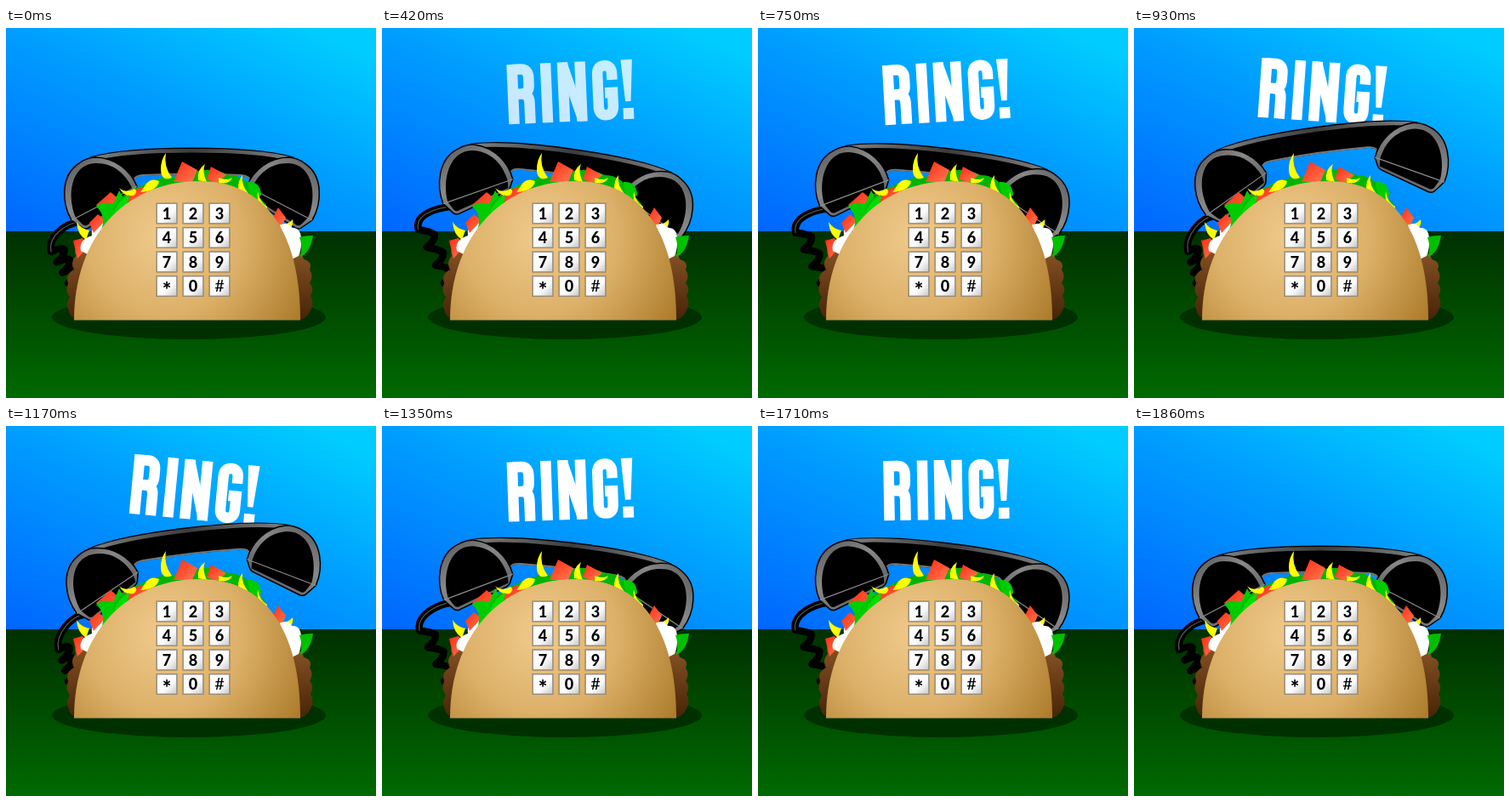
An HTML page for the animation above (1.89 s loop, 435 px wide and 435 px high).

```html
<!DOCTYPE html>
<html lang="en">
<head>
<meta charset="utf-8">
<title>Taco phone</title>
<style>
html, body { margin: 0; width: 100%; height: 100%; overflow: hidden; background: #003300; }
svg { display: block; width: 100vw; height: 100vh; }
.key { font: 800 18px Lato, "Open Sans", sans-serif; text-anchor: middle; fill: #000; }
.star { font-size: 25px; }
.hash { font-weight: 400; font-size: 20px; }
</style>
</head>
<body>
<svg viewBox="0 0 435 435" xmlns="http://www.w3.org/2000/svg">
  <defs>
    <linearGradient id="sky" gradientUnits="userSpaceOnUse" x1="0" y1="239" x2="167" y2="-123">
      <stop offset="0" stop-color="#0066ff"/><stop offset=".54" stop-color="#009dff"/><stop offset=".92" stop-color="#00ccff"/>
    </linearGradient>
    <linearGradient id="grass" x1="0" y1="0" x2="0" y2="1">
      <stop offset="0" stop-color="#003000"/><stop offset="1" stop-color="#006a00"/>
    </linearGradient>
    <radialGradient id="shell" gradientUnits="userSpaceOnUse" cx="185" cy="245" r="185">
      <stop offset="0" stop-color="#f0ca8c"/><stop offset=".5" stop-color="#dcb068"/><stop offset="1" stop-color="#ad7d2c"/>
    </radialGradient>
    <linearGradient id="meat" x1="0" y1="0" x2="0" y2="1">
      <stop offset="0" stop-color="#8a5425"/><stop offset="1" stop-color="#472407"/>
    </linearGradient>
    <linearGradient id="red" x1="0" y1="0" x2="1" y2="1">
      <stop offset="0" stop-color="#ff2a12"/><stop offset="1" stop-color="#ff7a55"/>
    </linearGradient>
    <linearGradient id="rim" x1="0" y1="0" x2="1" y2="1">
      <stop offset="0" stop-color="#555"/><stop offset=".4" stop-color="#888"/><stop offset="1" stop-color="#4c4c4c"/>
    </linearGradient>
    <linearGradient id="bar" gradientUnits="userSpaceOnUse" x1="100" y1="0" x2="337" y2="0">
      <stop offset="0" stop-color="#808080"/><stop offset=".5" stop-color="#3c3c3c"/><stop offset="1" stop-color="#808080"/>
    </linearGradient>
    <linearGradient id="cap" x1="0" y1="0" x2="1" y2="1">
      <stop offset="0" stop-color="#fff"/><stop offset=".6" stop-color="#fafafa"/><stop offset="1" stop-color="#c8c8c8"/>
    </linearGradient>
    <g id="ear" stroke-linejoin="round">
      <path d="M77 226C66 207 63 174 86 159C92 154.500 98 152.500 104 152C128 152 146 167 154 186L152 197Q151 200 148 202L97 235Q93 237 90 235Z" fill="url(#rim)" stroke="#000" stroke-width="1.500"/>
      <path d="M82 223C71 198 76 161 104 159C126 158 140 171 148 188L150 197L95 232Q92 233 90 231Z"/>
      <path d="M77 226L154 186" stroke="#8c8c8c" stroke-width="1.200"/>
    </g>
  </defs>

  <rect width="435" height="240" fill="url(#sky)"/>
  <rect y="239" width="435" height="196" fill="url(#grass)"/>
  <ellipse cx="215" cy="340" rx="161" ry="26" fill="#003000"/>

  <g id="ring" role="img" aria-label="RING!" fill="none" stroke="#fff" stroke-width="12.500">
    <path d="M-68 -35V35M-68 -29H-58Q-49 -29 -49 -19V-10Q-49 0 -58 0H-68M-58 0Q-49 0 -49 11V35"/>
    <path d="M-28.500 -35V35M-8.500 -35V35M12 -35V35"/>
    <path d="M-14 -35H-3L18 35H7Z" fill="#fff" stroke="none"/>
    <path d="M49 -12V-19Q49 -29 40.500 -29Q32 -29 32 -19V19Q32 29 40.500 29Q49 29 49 19V3H40"/>
    <path d="M60 -35H73.500L70 14H63.500ZM60.500 22H73V35H60.500Z" fill="#fff" stroke="none"/>
  </g>

  <g fill="none" stroke-linecap="round" stroke-linejoin="round">
    <path id="cord" stroke="#000" stroke-width="8.500"/>
    <path id="shine" stroke="#555" stroke-width="1.200"/>
  </g>

  <g id="phone">
    <path d="M100 152C150 137.700 287 137.700 337 152L290 186L286 177Q284 173.500 276 173Q219 170 161 173Q153 173.500 151 177L147 186Z" stroke="#000" stroke-width="1.500"/>
    <path d="M102 154C150 141 287 141 335 154" fill="none" stroke="url(#bar)" stroke-width="4.500"/>
    <path d="M149 180L151 177Q153 173.500 161 173Q219 170 276 173Q284 173.500 286 177L288 180" fill="none" stroke="#777" stroke-width="1.800"/>
    <use href="#ear"/>
    <use href="#ear" transform="matrix(-1 0 0 1 437 0)"/>
  </g>

  <g fill="url(#meat)">
    <path d="M92 252Q78 256 82 268Q75 276 80 284Q69 290 73 300Q69 310 75 316Q69 326 74 333Q75 342 90 343H130V252Z"/>
    <path d="M330 258Q348 261 350 272Q361 275 357 284Q362 292 357 300Q363 307 358 315Q363 325 358 332Q354 342 344 343H310Z"/>
  </g>
  <g id="filling"></g>
  <path d="M80 343.500C80 248 138 180 228 180C306 180 346 242 346 343.500Z" fill="url(#shell)"/>
  <g id="keys"></g>
</svg>
<script>
const $ = id => document.getElementById(id);

function add(parent, tag, attrs, text = '') {
  const el = document.createElementNS('http://www.w3.org/2000/svg', tag);
  for (const name in attrs) el.setAttribute(name, attrs[name]);
  el.textContent = text;
  parent.append(el);
}

const shape = (d, fill) => add($('filling'), 'path', { d, fill });
const tomato = d => shape(d, 'url(#red)');
const leaf = (d, fill = '#00b400') => shape(d, fill);
const cheese = d => shape(d, '#ffff00');

// Left side
tomato('M79 250L90 247L97 257L84 271Z');
tomato('M106 208L123 193L136 204L121 226Z');
cheese('M83 228Q88 236 98 238L94 249Q84 243 83 228Z');
shape('M88 262Q85 249 101 244Q99 233 112 230Q118 218 130 219L146 226L100 268Z', '#fff');
tomato('M98 229L108 219L117 226L103 241Z');
leaf('M106 210Q112 203 126 207L133 191Q142 203 137 216L112 238Q118 220 106 210Z', '#00cc00');
leaf('M126 215Q135 193 158 186Q174 176 195 175L205 185L150 212Z');
tomato('M140 198L158 187L186 190L150 211Z');
cheese('M133 188Q141 195 151 189Q156 192 150 197Q139 199 133 188Z');
cheese('M163 186Q169 175 180 180Q178 192 158 193Z');
leaf('M127 216Q132 202 145 196Q145 205 134 217Z', '#00dd00');

// Top
leaf('M180 185Q196 172 218 170Q240 162 262 173Q280 173 290 190L306 208Q299 217 288 205L240 188Z');
cheese('M188 147Q185 163 195 176Q182 181 182 166Q182 155 188 147Z');
tomato('M207 157L225 167L219 181L197 181Z');
cheese('M234 160Q230 168 236 181L226 179Q224 167 234 160Z');
tomato('M241 163L259 173L248 182L236 178Z');
cheese('M250 176Q260 180 266 176Q263 184 250 182Z');

// Right side
cheese('M278 173Q276 185 286 196Q279 199 273 188Q273 179 278 173Z');
leaf('M284 181Q299 180 300 196L293 205Q284 194 284 181Z', '#00cc00');
cheese('M296 192Q298 205 307 210L306 218Q294 211 296 192Z');
tomato('M320 211L329 223L323 236L312 226Z');
cheese('M322 231Q331 232 337 225Q339 236 326 240Z');
shape('M322 232Q331 227 336 235Q346 234 347 247Q348 258 344 268L336 272Z', '#fff');
leaf('M345 246Q351 244 361 244Q358 264 346 269Q349 256 345 246Z', '#00c000');

const keyClass = { '*': 'key star', '#': 'key hash' };
[...'123456789*0#'].forEach((label, i) => {
  const x = 177 + i % 3 * 31, y = 206 + Math.floor(i / 3) * 28.5;
  add($('keys'), 'rect', { x: x - .5, y: y - .5, width: 25, height: 25, fill: '#8f7a55' });
  add($('keys'), 'rect', { x: x + .5, y: y + .5, width: 23, height: 23, fill: 'url(#cap)', stroke: '#999' });
  add($('keys'), 'text', { x: x + 12, y: y + (label === '*' ? 25.5 : 18.5), class: keyClass[label] || 'key' }, label);
});

// Linear interpolation through [time, value] points
function track(t, points) {
  if (t <= points[0][0]) return points[0][1];
  for (let i = 1; i < points.length; i++) {
    const [t0, v0] = points[i - 1], [t1, v1] = points[i];
    if (t <= t1) return v0 + (v1 - v0) * (t - t0) / (t1 - t0);
  }
  return points[points.length - 1][1];
}

const LOOP = 1890, STEP = 30, START = 300, PIVOT = [218.5, 180];
const swing = [[270, 0], [420, 8], [570, 5.5], [930, 8], [1170, 6.7], [1560, 7], [1740, 7], [1860, 0]];
const lift = [[270, 0], [420, -12], [570, -9], [930, -12], [1170, -11], [1560, -20], [1740, -14], [1860, 0]];
const sway = [[270, 1], [420, 4], [570, 7], [930, 2.5], [1170, 4], [1560, 3], [1860, 2]];
const fade = [[270, 0], [420, .78], [460, 1], [1710, 1], [1860, 0]];

function drawCord(angle, dy) {
  const r = angle * Math.PI / 180, c = Math.cos(r), s = Math.sin(r);
  const ox = 86 - PIVOT[0], oy = 228 - PIVOT[1];
  const ax = PIVOT[0] + ox * c - oy * s, ay = PIVOT[1] + ox * s + oy * c + dy;
  const bx = 53 - 1.3 * angle, by = 263 - 3.3 * Math.max(angle, 0);
  const strand = `M${ax} ${ay}C${ax - 16} ${ay + 2} ${bx - 4} ${by - 18} ${bx} ${by}`;
  const loops = 3, ex = 73, ey = 300;
  let coil = '';
  for (let i = 1; i <= loops; i++) {
    const x = bx + (ex - bx) * i / loops, y = by + (ey - by) * i / loops;
    coil += `Q${x + 6} ${y - 18} ${x + 9} ${y - 15}Q${x + 10} ${y - 8} ${x} ${y}`;
  }
  $('cord').setAttribute('d', strand + coil);
  $('shine').setAttribute('d', strand);
}

function draw(time) {
  const t = time % LOOP;
  const k = Math.floor((t - START) / STEP), now = START + k * STEP;
  const still = k < 0;
  const side = Math.SQRT2 * Math.cos((k % 4) * Math.PI / 2 + Math.PI / 4);
  const angle = still ? 0 : side * track(now, swing);
  const dy = still ? 0 : track(now, lift) + 1.6 * angle;
  $('phone').setAttribute('transform', `translate(0 ${dy}) rotate(${angle} ${PIVOT})`);
  $('ring').setAttribute('transform', `translate(222 75) rotate(${1.5 - side * track(now, sway)})`);
  $('ring').setAttribute('opacity', still ? 0 : track(now, fade));
  drawCord(angle, dy);
}

const begin = performance.now();
function tick() {
  draw(performance.now() - begin);
  requestAnimationFrame(tick);
}
tick();
</script>
</body>
</html>
```
